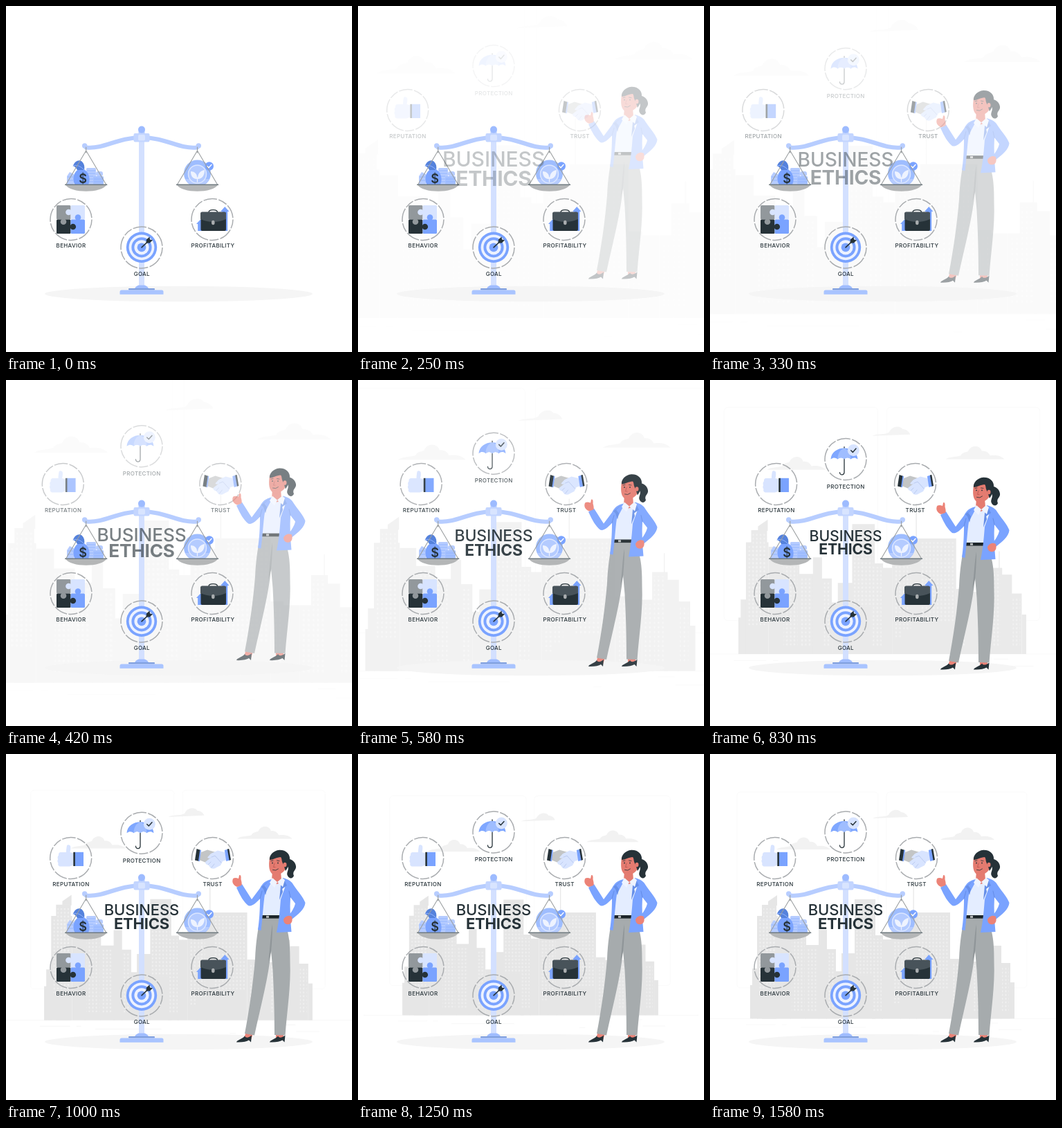
An HTML page that plays this animation: 500 px wide and 500 px high, repeating every 1.62 s.

```html
<!DOCTYPE html>
<html lang="en">
<head>
<meta charset="utf-8">
<title>Business ethics</title>
<style>
html, body { margin: 0; width: 100%; height: 100%; overflow: hidden; background: #fff; }
svg { display: block; width: 100%; height: 100%; }
text { font-family: Montserrat, Inter, sans-serif; fill: #263238; text-anchor: middle; }
.label { font-size: 8px; font-weight: 450; letter-spacing: .32px; }
.ring { fill: none; stroke: #a9acaf; stroke-width: 1.5; stroke-dasharray: 7 1.2 10.5 1.3; }
.line { fill: none; stroke-linecap: round; stroke-linejoin: round; }
.dark { fill: #263238; }
.blue { fill: #7aa3ff; }
.pale { fill: #d8e4ff; }
.skin { fill: #ec8377; }
.face { fill: #e47b70; }
</style>
</head>
<body>
<svg viewBox="0 0 500 500" xmlns="http://www.w3.org/2000/svg">
  <defs>
    <pattern id="win" width="5" height="5.4" patternUnits="userSpaceOnUse">
      <rect x="1.4" y="1.4" width="2" height="2.4" fill="#f0f0f0"/>
    </pattern>
    <path id="cloud" d="M0 18C5 14 14 15 20 13C22 8 28 9 30 7C34 -2 46 -1 48 7C55 6 58 11 59 13C66 12 74 13 78 18Z" fill="#f2f2f2"/>
    <g id="pan">
      <path class="line" d="M0 209L-29 258M0 209L29 258M0 204V212" stroke="#9b9fa1" stroke-width="1.1"/>
      <path d="M-30 258H30C23 271 -23 271 -30 258Z" fill="#b4b6b7"/>
      <path class="line" d="M-30 258.2H30" stroke="#707b80" stroke-width="1.5"/>
    </g>
  </defs>

  <g id="back">
    <g fill="none" stroke="#f8f8f8" stroke-width=".7">
      <rect x="39" y="55" width="204" height="283" rx="5"/>
      <rect x="255" y="55" width="203" height="283" rx="5"/>
    </g>
    <path d="M0 382.4H500M417 398.5h33M322 401h9M397 389h19M52 391h43M104 391h7M131 395h94" stroke="#f0f0f0" stroke-width=".5"/>
    <use href="#cloud" x="96" y="120"/>
    <use href="#cloud" x="333" y="106"/>
    <path d="M235 93C243 89 252 92 258 88C262 79 273 79 276 84C281 84 285 88 286 91Z" fill="#f2f2f2"/>
    <g id="city"></g>
  </g>

  <ellipse cx="249.5" cy="416" rx="193.5" ry="11.3" fill="#f5f5f5"/>

  <g id="scale">
    <rect x="192" y="194" width="8" height="212" fill="#d3e0ff"/>
    <path d="M186 408.5Q187 405 191.5 403.5H200.5Q205 405 206 408.5Z" fill="#9fbcff"/>
    <rect x="177" y="408" width="38" height="2.6" rx="1" fill="#7f9fdf"/>
    <path d="M164.5 416.7V413Q164.5 410.5 167 410.5H225Q227.5 410.5 227.5 413V416.7Z" fill="#a9c4ff"/>
    <path class="line" d="M116 204.5C143 207 160 190 196 190C232 190 249 207 276 204.5" stroke="#b7cdff" stroke-width="6.2"/>
    <circle cx="113.7" cy="202" r="3.7" fill="#b7cdff"/>
    <circle cx="278.3" cy="202" r="3.7" fill="#b7cdff"/>
    <rect x="191.5" y="180" width="9" height="6" fill="#b7cdff"/>
    <circle cx="196" cy="178.5" r="5" fill="#9dbbff"/>
    <rect x="184.5" y="184" width="23" height="12.5" rx="2" fill="#c3d5ff"/>
    <rect x="191" y="186" width="10" height="8.5" rx="2" fill="#d8e4ff"/>

    <g fill="#b6ccff">
      <path d="M88 258V246L92 240L98 243V258Z"/>
      <rect x="116" y="234" width="14" height="24" rx="1.5"/>
      <rect x="126" y="246" width="15" height="12" rx="1.5" fill="#a5c1ff"/>
      <rect x="130" y="239" width="10" height="7" rx="3"/>
    </g>
    <path d="M89 247h8M89 252h8M117 238h12M117 242h12M117 246h9M117 250h9M117 254h9M127 250h13M127 254h13" stroke="#8db0ff" stroke-width=".8"/>
    <path class="blue" d="M99 258C95 247 99 239 105 236H113C119 240 123 249 119 258Z"/>
    <path d="M97 231C99 224 106 221 110 225C113 228 114 232 113 237H103C101 233 99 232 97 231Z" fill="#5582dc"/>
    <path d="M97 231C101 229 108 231 113 237" class="line" stroke="#91b3ff"/>
    <text x="111" y="255.5" style="font-size:18px;font-weight:600">$</text>
    <use href="#pan" x="115.7"/>

    <circle cx="276.5" cy="242" r="19.5" fill="#9ebdff"/>
    <path d="M259 250A19.5 19.5 0 0 0 294 250Z" fill="#b6ccff"/>
    <circle cx="276.5" cy="243" r="13" fill="#b4cbff" stroke="#dbe6ff" stroke-width="1.5"/>
    <path d="M276 250C268 250 267 243 267 239C273 239 277 243 276 250ZM277 250C277 243 280 238 287 237C287 244 284 250 277 250Z" fill="#eef3ff"/>
    <path class="line" d="M276.5 248V254" stroke="#eef3ff" stroke-width="1.3"/>
    <circle class="blue" cx="293.8" cy="231.5" r="6.2"/>
    <path class="line" d="M290.8 231.6L293 233.8L297 229.3" stroke="#fff" stroke-width="1.4"/>
    <use href="#pan" x="276.5"/>
  </g>

  <g id="behavior">
    <circle class="ring" pathLength="100" cx="94" cy="308.5" r="30"/>
    <rect x="73" y="288" width="20.5" height="20.5" rx="1.5" fill="#92989c"/>
    <rect class="pale" x="93.5" y="288" width="20.5" height="20.5" rx="1.5"/>
    <rect class="dark" x="73" y="308.5" width="20.5" height="20.5" rx="1.5"/>
    <rect class="blue" x="93.5" y="308.5" width="20.5" height="20.5" rx="1.5"/>
    <circle class="pale" cx="90.5" cy="298" r="4.3"/>
    <circle class="blue" cx="104" cy="305.5" r="4.3"/>
    <circle class="dark" cx="96.8" cy="319" r="4.3"/>
    <circle cx="83" cy="311.8" r="4.3" fill="#92989c"/>
    <text class="label" x="94" y="348.8">BEHAVIOR</text>
  </g>

  <g id="goal">
    <circle class="ring" pathLength="100" cx="196" cy="349" r="30"/>
    <circle class="blue" cx="196" cy="348.8" r="22.2"/>
    <circle cx="196" cy="348.8" r="18.4" fill="#edf2ff"/>
    <circle class="blue" cx="196" cy="348.8" r="14.6"/>
    <circle cx="196" cy="348.8" r="10.6" fill="#edf2ff"/>
    <circle class="blue" cx="196" cy="348.8" r="6.4"/>
    <path class="line" d="M196 348.8L207 338.5" stroke="#263238" stroke-width="1.6"/>
    <path class="dark" d="M202.5 342.5L203 337.5L207.5 333.5L208 337.5L212 338.3L207.7 342.5Z"/>
    <text class="label" x="196.3" y="389.8">GOAL</text>
  </g>

  <g id="profit">
    <circle class="ring" pathLength="100" cx="298" cy="308.5" r="30"/>
    <path class="blue" d="M277.2 325V315H275L281 308.5L287 315H285.5V325ZM312.5 325V297H310L316.3 290L322.5 297H320.2V325Z"/>
    <path class="line" d="M293 298C293 293.5 305.5 293.5 305.5 298" stroke="#263238" stroke-width="1.4"/>
    <rect class="dark" x="281.5" y="298" width="36.5" height="27" rx="2"/>
    <path d="M281 300Q281 297.5 283.5 297.5H315.5Q318 297.5 318 300V308Q309 312 299.5 312Q290 312 281 308Z" fill="#48535a"/>
    <ellipse cx="299.3" cy="313" rx="2.3" ry="3.3" fill="#a9adaf"/>
    <text class="label" x="299" y="348.8">PROFITABILITY</text>
  </g>

  <g id="protect">
    <circle class="ring" pathLength="100" cx="196" cy="113" r="30"/>
    <path class="line" d="M194 95V131.5C194 136.5 187.5 136.5 187.5 132" stroke="#263238" stroke-width="1.3"/>
    <path d="M174.5 113C175 103 184 97 194 97C204 97 213 103 213.5 113C210 110 206 110.5 203.5 113C200.5 110 197 110 194 113C191 110 187.5 110 184.5 113C182 110.5 178 110 174.5 113Z" fill="#7fa7ff"/>
    <path d="M184.5 113C184.5 105 188 99 194 97C200 99 203.5 105 203.5 113C200.5 110 197 110 194 113C191 110 187.5 110 184.5 113Z" fill="#9fbdff"/>
    <circle class="pale" cx="207.3" cy="100" r="8.5"/>
    <path class="line" d="M203.7 100.2L206.3 102.8L211 97.5" stroke="#263238" stroke-width="1.5"/>
    <text class="label" x="196.2" y="155.3">PROTECTION</text>
  </g>

  <g id="repute">
    <circle class="ring" pathLength="100" cx="93.7" cy="150.5" r="30"/>
    <path class="pale" d="M79 142H87C87 138 87.500 135 88 132.500C89 130.500 93 131 93.300 134C93.500 137 93 140 92.500 142L97.500 143.500V160.500L92 162.500H79C75.500 162.500 74.800 160 75.500 157.500C74 156 74.200 153.500 75.200 152C74.200 150 74.500 147.500 76 146.500C75.500 143.500 77 142 79 142Z"/>
    <rect class="blue" x="99" y="141.8" width="13" height="20.2"/>
    <rect class="dark" x="97.3" y="141.8" width="2.6" height="20.2"/>
    <text class="label" x="94" y="190.8">REPUTATION</text>
  </g>

  <g id="trust">
    <circle class="ring" pathLength="100" cx="298.5" cy="150.5" r="30"/>
    <path d="M282 142L291 138.500L303 142L310 154L301 161L289 157L279 153Z" fill="#c3c5c6"/>
    <path class="pale" d="M316 142L306 139.500L296 144L291 149.500Q293 152 297 149L288 156Q288 160 292 160L296 165Q301 167 304 164L310 161L313 155L319 153Z"/>
    <path class="line" d="M297 149L302 147L311 157M292 160L296 156M297 164L301 159" stroke="#aebfe8" stroke-width=".7"/>
    <path class="dark" d="M275.5 137L281.500 139L279 155L273 153.500Z"/>
    <path class="blue" d="M280.3 138.600L282 139.200L279.800 155.200L278 154.800Z"/>
    <path class="blue" d="M315.800 139L320.500 137.400L323.200 153.500L318.300 155Z"/>
    <path class="dark" d="M319.800 137.600L322.300 137L325 153L322.600 153.700Z"/>
    <text class="label" x="298.7" y="190.8">TRUST</text>
  </g>

  <g id="title">
    <text x="196" y="233" style="font-size:22px;font-weight:450;letter-spacing:-.1px">BUSINESS</text>
    <text x="196" y="253" style="font-size:22px;font-weight:700;letter-spacing:-.2px">ETHICS</text>
  </g>

  <g id="woman">
    <path class="skin" d="M347 401H358L354 413L343 414ZM390 401H402L400 413L390 414Z"/>
    <path class="dark" d="M333 416.500C334 413 341 412.500 345 407.500C347 411 351 410 355 406.500L354 416.500L351 413.500Q346 417 333 416.500ZM381 416.500C382 413 389 412.500 393 407.500C395 411 399 410 403.500 406.500L402.500 416.500L399.500 413.500Q394 417 381 416.500Z"/>
    <path d="M368 236H397C406 247 411 262 410.500 300C412 335 406 372 403.500 406.500L388 406C388 372 387 340 385.500 312L383 284C380 320 368 365 359 406.500L345 404C352 367 357 332 360 296C361 272 364 252 368 236Z" fill="#a6abad"/>
    <path d="M385 246C385 262 384 275 383 286L379 300C382 280 382 262 385 246Z" fill="#8f9598"/>
    <path fill="#e4edff" d="M374 186L385 180L401 181L399 234H368Z"/>
    <rect x="368" y="233" width="29" height="4.6" fill="#1c2529"/>
    <rect x="376" y="233.8" width="4" height="3" fill="#b8bbbd"/>
    <path class="face" d="M385 168H397L398 183Q390 193 384 183Z"/>
    <path class="blue" d="M384 181C375 183 371 186 367 194L355 210L341 188L333 193C339 206 343 213 350 219C355 221 362 215 367 209C367 226 366 240 364 254L368.500 255C371 235 372 215 374 203L383 186Z"/>
    <path class="blue" d="M400 179C408 181 413 184 416 190C422 199 429 206 432.500 215C432 224 422 232 413 239L407 236C412 229 417 222 418 216L411 207C410 224 411 240 412.500 257L391 258C395 240 396 222 397 210L404 190Z"/>
    <path class="line" d="M367 209L370 198M411 207L409 198" stroke="#5d86e0" stroke-width=".8"/>
    <path d="M400 179L406 190L399 195L400 199L395 211L397 190ZM382 182L373 190L377 195L375 204L372 195L369 192Z" fill="#668fe8"/>
    <path d="M385 179L381 186L388 193L392 185L400 192L403 182L399 179L392 185Z" fill="#eff4ff"/>
    <path class="skin" d="M413 235C408 232 403 235 401 239C401 244 404 247 409 246C413 245 414 241 413.500 238Z"/>
    <path class="skin" d="M334 192C329 190 326.500 186 327.500 182C328 178 333 179 336 180L337 175.500C339 174 340 177 339.500 181C341 186 341 189 340 190Z"/>
    <path class="dark" d="M403 152C411 150 418 155 419 162C420 168 413 169 416 176C414 181 409 180 407 176C404 171 411 166 406 161Z"/>
    <path class="face" d="M381 150C379 162 380 172 387 174.500C396 176 405 169 406 160C407 150 400 145 393 145C386 145 382 147 381 150Z"/>
    <path class="dark" d="M381 153C380 147 386 139.500 395 138.800C405 138.500 411 145 410 153C409 160 407 165 404 169C402 164 402 161 400 158C398 154 399 151 397 149C391 149 386 153 381 153Z"/>
    <ellipse class="face" cx="403" cy="160" rx="2.5" ry="3.3"/>
    <circle class="dark" cx="385" cy="157.5" r=".9"/>
    <circle class="dark" cx="393" cy="157.5" r=".9"/>
    <path class="line" d="M383 154.500l3-.5M391.500 154l3.500 .5M385.500 167.500Q390 169.500 393.500 166" stroke="#263238" stroke-width=".8"/>
    <path class="line" d="M388 158L386.500 163.500H389" stroke="#b9544e" stroke-width=".8"/>
  </g>
</svg>
<script>
const $ = id => document.getElementById(id);

// skyline: x, width, top
const towers = [
  [58, 4, 334], [61, 8, 310], [68, 30, 234], [75, 21, 218], [98, 19, 240], [116, 23, 261],
  [138, 20, 276], [157, 12, 254], [168, 14, 282], [182, 10, 314], [190, 20, 288],
  [209, 30, 210], [234, 16, 262], [248, 14, 268], [262, 14, 250], [275, 14, 240],
  [288, 11, 229], [298, 49, 229], [347, 14, 296], [360, 18, 300], [378, 14, 300],
  [390, 18, 268], [404, 17, 277], [420, 14, 302], [434, 6, 330]
];
$('city').innerHTML =
  '<path d="M84 219V213L97 204V219ZM293.5 230V183H294.7V230ZM403.5 270V246H404.7V270Z" fill="#e6e6e6"/>' +
  towers.map(([x, w, y]) => `<path d="M${x} 382.4V${y}h${w}V382.4Z" fill="#e6e6e6"/>`).join('') +
  towers.filter((b, i) => b[1] > 11 && i % 3 != 1 || b[1] > 40).map(([x, w, y]) =>
    `<rect x="${x + 2}" y="${y + 5}" width="${w - 4}" height="${Math.min(105, 368 - y)}" fill="url(#win)"/>`).join('');

const LOOP = 1620, STEP = 1000 / 24;
const bez = (u, a, b) => 3 * a * u * (1 - u) ** 2 + 3 * b * u * u * (1 - u) + u ** 3;

// eased progress with a soft overshoot
function ease(p) {
  if (p <= 0) return 0;
  if (p >= 1) return 1;
  let lo = 0, hi = 1;
  for (let i = 0; i < 24; i++) {
    const m = (lo + hi) / 2;
    if (bez(m, .36, .5) < p) lo = m; else hi = m;
  }
  return bez((lo + hi) / 2, -.01, 1.38);
}

function put(id, e, move) {
  $(id).setAttribute('opacity', Math.max(0, Math.min(1, e)).toFixed(4));
  $(id).setAttribute('transform', move);
}
const slide = (id, e, dx, dy) => put(id, e, `translate(${dx * (1 - e)} ${dy * (1 - e)})`);
const zoom = (id, e, x, y) =>
  put(id, e, `translate(${x} ${y}) scale(${1.5 - .5 * e}) translate(${-x} ${-y})`);

function draw(ms) {
  const k = Math.floor((ms % LOOP + 10) / STEP);
  const t = k < 2 ? 0 : k * STEP + 22;
  const main = ease(t / 1000);
  slide('repute', main, -30, 0);
  slide('trust', main, 30, 0);
  slide('woman', main, 0, -30);
  slide('protect', ease((t - 90) / 1000), 0, -30);
  zoom('title', main, 196, 235);
  zoom('back', ease(t / 1575), 249, 229.4);
}

const start = performance.now();
function tick() {
  draw(performance.now() - start);
  requestAnimationFrame(tick);
}
draw(0);
requestAnimationFrame(tick);
</script>
</body>
</html>
```
